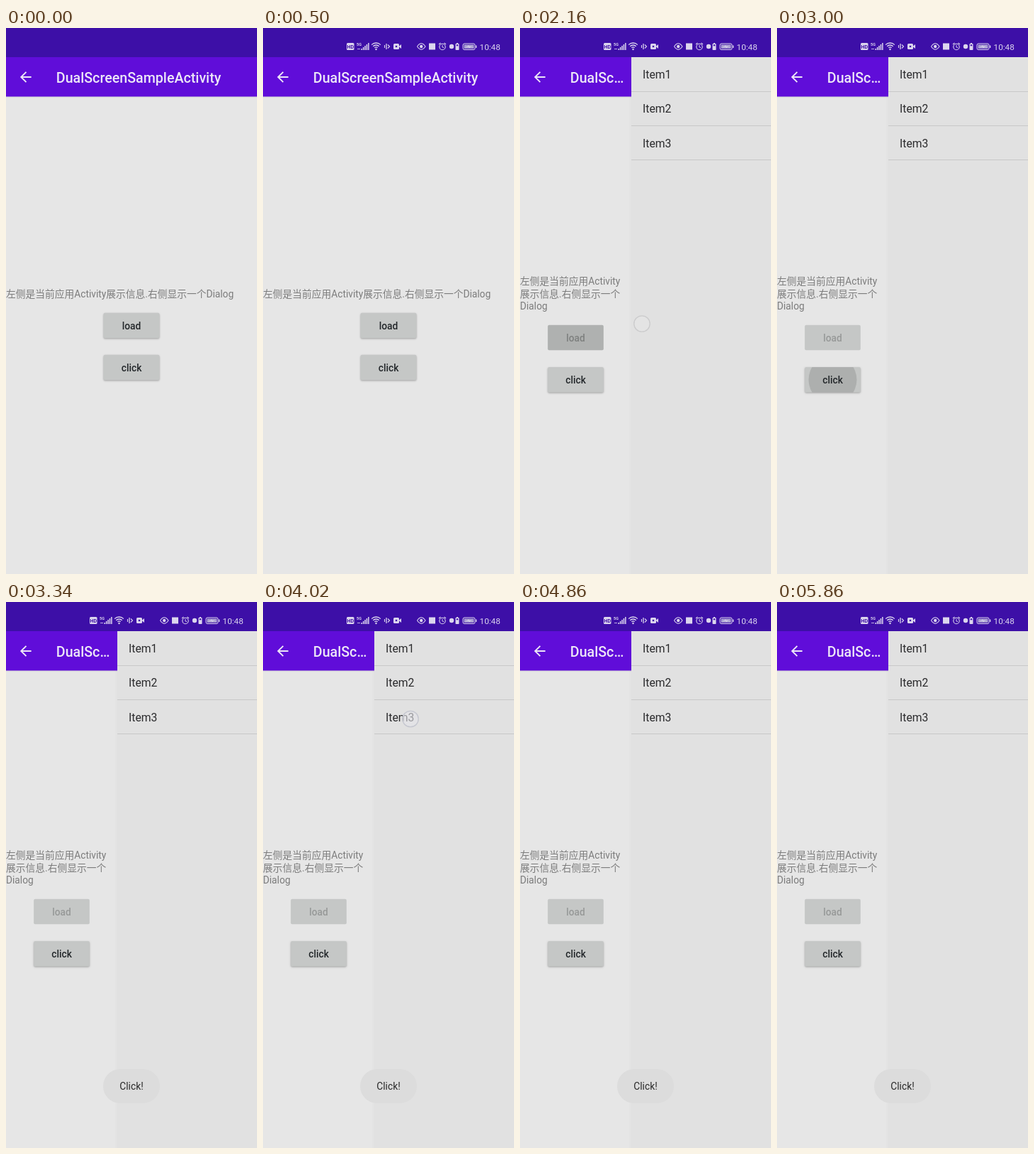
Recreate the animation shown at these times as an HTML page with a canvas. Size 354 by 768 pixels, loop 6200 ms.

```html
<!DOCTYPE html>
<html lang="en">
<head>
<meta charset="utf-8">
<title>Dual screen sample</title>
<style>
html, body { margin: 0; width: 100%; height: 100%; overflow: hidden; background: #e6e6e6; }
canvas { display: block; width: 354px; height: 768px; }
</style>
</head>
<body>
<canvas id="stage"></canvas>
<script>
const W = 354, H = 768, LOOP = 6200;
const DP = W / 360;
const SANS = "Roboto, 'Noto Sans CJK SC', 'Noto Sans CJK', sans-serif";
const PANEL_X = 157, ROW_Y = 41, ROW_H = 48.18;
const ARROW = new Path2D("M20,11H7.83l5.59,-5.59L12,4l-8,8 8,8 1.41,-1.41L7.83,13H20v-2z");

const canvas = document.getElementById("stage");
const ctx = canvas.getContext("2d");
const dpr = window.devicePixelRatio || 1;
canvas.width = W * dpr;
canvas.height = H * dpr;

const within = (t, from, to) => t >= from && t < to;

function rect(x, y, w, h, color) {
  ctx.fillStyle = color;
  ctx.fillRect(x, y, w, h);
}

function roundRect(x, y, w, h, r, color) {
  ctx.beginPath();
  ctx.roundRect(x, y, w, h, r);
  ctx.fillStyle = color;
  ctx.fill();
}

function disc(x, y, r, color) {
  ctx.beginPath();
  ctx.arc(x, y, r, 0, Math.PI * 2);
  ctx.fillStyle = color;
  ctx.fill();
}

function arc(x, y, r, from, to, width = 1) {
  ctx.beginPath();
  ctx.arc(x, y, r, from * Math.PI, to * Math.PI);
  ctx.lineWidth = width;
  ctx.stroke();
}

function line(width, ...points) {
  ctx.beginPath();
  points.forEach(([x, y]) => ctx.lineTo(x, y));
  ctx.lineWidth = width;
  ctx.stroke();
}

function text(str, x, y, size, color, weight = 400, align = "left") {
  ctx.font = `${weight} ${size}px ${SANS}`;
  ctx.textAlign = align;
  ctx.fillStyle = color;
  ctx.fillText(str, x, y);
}

function statusIcons() {
  const ink = "#dcd6ee", bar = "#3d0fa7";
  ctx.strokeStyle = ink;

  roundRect(118, 21, 10.5, 10, 1.5, ink);
  text("HD", 123.2, 28.6, 7, bar, 700, "center");

  text("5G", 132, 24.5, 5.5, ink, 700);
  line(0.8, [133, 29.5], [137, 29.5]);
  for (let i = 0; i < 5; i++) rect(138.5 + i * 2.4, 29 - i * 2, 1.5, 2 + i * 2, ink);

  for (let r = 3; r <= 9; r += 3) arc(159.5, 30, r, 1.25, 1.75, 1.3);
  disc(159.5, 30, 1.2, ink);

  line(1.1, [171.5, 24], [171.5, 28]);
  line(1.3, [174, 22], [174, 30]);
  line(1.1, [176, 23.5], [178.5, 26], [176, 28.5]);

  roundRect(184, 22, 8, 8, 1.5, ink);
  ctx.beginPath();
  ctx.moveTo(191.5, 26);
  ctx.lineTo(195, 23);
  ctx.lineTo(195, 29);
  ctx.fill();
  disc(188, 26, 1.3, bar);

  ctx.beginPath();
  ctx.moveTo(217.5, 26);
  ctx.quadraticCurveTo(223.2, 17.5, 229, 26);
  ctx.quadraticCurveTo(223.2, 34.5, 217.5, 26);
  ctx.lineWidth = 1.1;
  ctx.stroke();
  disc(223.2, 26, 2.2, ink);

  roundRect(234, 21.5, 9, 9, 0, ink);

  arc(253, 26.5, 4.2, 0, 2, 1.1);
  line(1, [253, 24], [253, 26.8], [255, 27.8]);
  line(1.1, [248, 23], [250.5, 21]);
  line(1.1, [255.5, 21], [258, 23]);

  disc(266, 26, 3.2, ink);
  rect(273, 21, 2, 1.2, ink);
  roundRect(271.5, 22, 5, 9, 0.8, ink);
  rect(272.8, 23.3, 2.4, 2, bar);

  ctx.beginPath();
  ctx.roundRect(282, 22, 17, 8.5, 2);
  ctx.lineWidth = 1;
  ctx.stroke();
  rect(283.5, 23.5, 14, 5.5, "#aaa0d2");
  line(1, [287, 26.8], [290.5, 25], [290.5, 27.3], [294, 25.5]);
  rect(300, 24.5, 1.3, 3.5, ink);

  text("10:48", 305.6, 30.6, 11.7, ink);
}

function appBar(right, title) {
  rect(0, 41, right, 55.5, "#600dd9");
  rect(0, 96.5, right, 1, "rgba(0,0,0,.07)");
  ctx.save();
  ctx.translate(16, 57.2);
  ctx.scale(DP, DP);
  ctx.fillStyle = "#ece6f7";
  ctx.fill(ARROW);
  ctx.restore();
  text(title, 70.8, 76.5, 20 * DP, "#ece6f7", 500);
}

function button(label, cx, y, { enabled = true, bg = "#c5c7c6", ink = "#23272a", ripple = 0 } = {}) {
  const w = 80 * DP, h = 36 * DP, x = cx - w / 2;
  ctx.save();
  if (enabled) {
    ctx.shadowColor = "rgba(0,0,0,.3)";
    ctx.shadowBlur = 2.5 * dpr;
    ctx.shadowOffsetY = dpr;
  }
  roundRect(x, y, w, h, 2, bg);
  ctx.restore();
  if (ripple) {
    ctx.save();
    ctx.beginPath();
    ctx.roundRect(x, y, w, h, 2);
    ctx.clip();
    disc(cx, y + h / 2, ripple, "rgba(0,0,0,.12)");
    ctx.restore();
  }
  text(label, cx, y + 22.9, 14 * DP, ink, 500, "center");
}

function note(lines, y) {
  lines.forEach((str, i) => text(str, 0, y + i * 17.6, 14 * DP, "#7c7c7c"));
}

function panel(t) {
  const edge = ctx.createLinearGradient(PANEL_X - 5, 0, PANEL_X, 0);
  edge.addColorStop(0, "rgba(0,0,0,0)");
  edge.addColorStop(1, "rgba(0,0,0,.02)");
  rect(PANEL_X - 5, 97, 5, H - 97, edge);
  rect(PANEL_X, ROW_Y, W - PANEL_X, H - ROW_Y, "#e1e1e1");

  const pressed = within(t, 4190, 4520) ? 2 : within(t, 4690, 4860) ? 1 : -1;
  for (let i = 0; i < 3; i++) {
    const y = ROW_Y + i * ROW_H;
    if (i === pressed) rect(PANEL_X, Math.round(y), W - PANEL_X, 48, "#c9c9c9");
    rect(PANEL_X, 89 + i * 48, W - PANEL_X, 1, "#c8c8c8");
    text("Item" + (i + 1), 173, y + 30.3, 16 * DP, "#2b2b2d");
  }
}

function toast() {
  roundRect(137, 657, 80, 48, 24, "#dcdcdc");
  text("Click!", 177, 686.4, 14 * DP, "#2a2a2a", 400, "center");
}

function touch(x, y, fill, ring) {
  disc(x, y, 11.2, fill);
  ctx.strokeStyle = ring;
  arc(x, y, 11.2, 0, 2, 1.3);
}

function fullScreen() {
  appBar(W, "DualScreenSampleActivity");
  note(["左侧是当前应用Activity展示信息.右侧显示一个Dialog"], 379);
  button("load", W / 2, 400.8);
  button("click", W / 2, 459.8);
}

function splitScreen(t) {
  const load = t < 2330 ? ["#afb1b0", "#7e807f"]
    : t < 2500 ? ["#babcbb", "#8b8d8c"]
    : ["#c5c7c6", "#979998"];
  const ripple = within(t, 3000, 3170) ? 34
    : within(t, 3170, 3340) || within(t, 3510, 3680) ? 45 : 0;

  appBar(PANEL_X, "DualSc…");
  note(["左侧是当前应用Activity", "展示信息.右侧显示一个", "Dialog"], 361);
  button("load", PANEL_X / 2, 417.8, { enabled: false, bg: load[0], ink: load[1] });
  button("click", PANEL_X / 2, 477, { ripple });
  panel(t);
  if (t >= 3170) toast();

  if (t < 2330) touch(172, 416, "rgba(232,232,232,.5)", "#cbcbcc");
  if (within(t, 4020, 4190)) touch(208, 164.5, "rgba(228,229,233,.6)", "#c4c6cf");
  if (within(t, 4520, 4690)) touch(235, 115, "#e4e5e8", "#c2c4cb");
}

function draw(t) {
  ctx.setTransform(dpr, 0, 0, dpr, 0, 0);
  rect(0, 0, W, H, "#e6e6e6");
  rect(0, 0, W, 41, "#3d0fa7");
  if (t < 2160) fullScreen();
  else splitScreen(t);
  if (t >= 170) statusIcons();
}

const start = performance.now();
function tick() {
  draw((performance.now() - start) % LOOP);
  requestAnimationFrame(tick);
}
tick();
</script>
</body>
</html>
```
